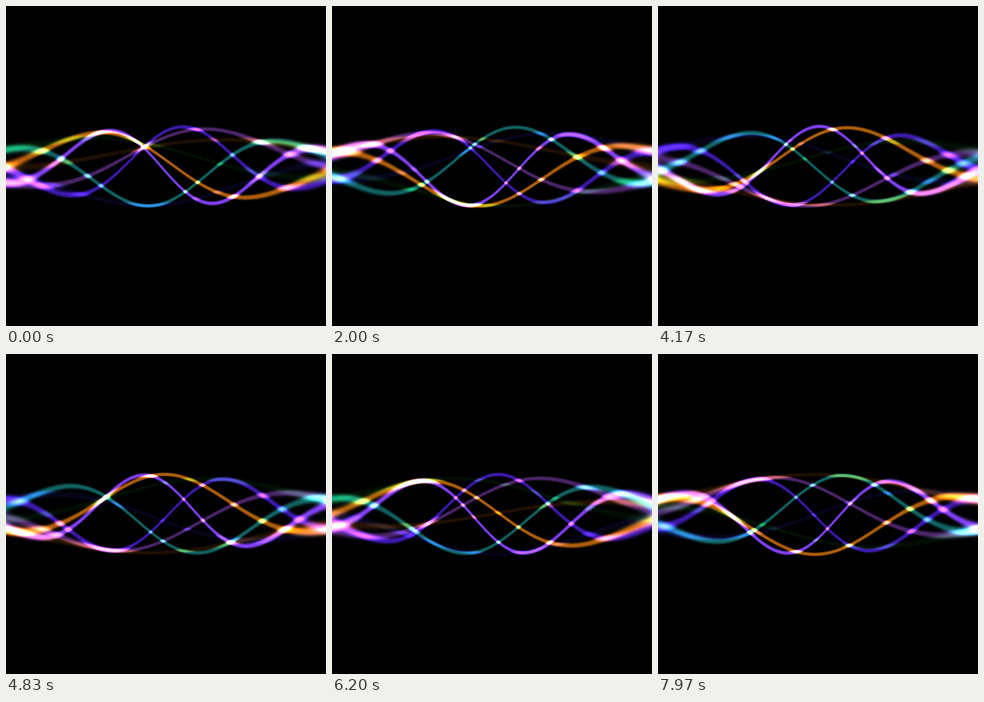
Write an HTML page with a canvas that moves like this. It is 400 px wide and 400 px high and loops after 8000 ms.

```html
<!DOCTYPE html>
<html lang="en">
<head>
<meta charset="utf-8">
<title>Light waves</title>
<style>
  html, body { margin: 0; width: 100%; height: 100%; overflow: hidden; background: #000; }
  canvas { display: block; width: 100%; height: 100%; }
</style>
</head>
<body>
<canvas id="stage" width="400" height="400"></canvas>
<script>
const SIZE = 400, MID = 200, TOP = 130, BAND = 140;
const LOOP = 8000, FRAME = 100 / 3;

// k: radians per pixel, w: radians per second, p: phase at the left edge.
// Light is added up first and squared afterwards, so crossings flare.
const waves = [
  { k: .02285, w: 1.085, p: -1.275, rgb: [.71, .5, .98] },
  { k: .0207,  w: 1.062, p: -3.045, rgb: [.49, .31, .82] },
  { k: .0176,  w: 1.047, p: 1.65,   rgb: [.26, .62, .62] },
  { k: .0147,  w: 1.014, p: .052,   rgb: [.83, .61, .22] },
  { k: .01153, w: .986,  p: -1.473, rgb: [.54, .38, .64] },
  { k: .0075,  w: .95,   p: -2.76,  rgb: [.16, .14, .33] },
  { k: .006,   w: .9375, p: 1.468,  rgb: [.08, .24, .1] },
  { k: .0035,  w: .92,   p: -.11,   rgb: [.35, .25, .05] }
];

// Towards the sides the lines swing less, widen and soften.
const columns = Array.from({ length: SIZE }, (_, x) => {
  const d = x + .5 - MID, u = Math.abs(d) / MID;
  return {
    swing: 50 * Math.exp(-d * d / 46000),
    width: 2.6 + 4 * u * u,
    power: 4 - 1.7 * u
  };
});

const ctx = document.getElementById("stage").getContext("2d");
const image = ctx.createImageData(SIZE, BAND);
const light = new Float32Array(SIZE * BAND * 3);

function addWave({ k, w, p, rgb: [r, g, b] }, seconds) {
  columns.forEach(({ swing, width, power }, x) => {
    const y = MID - TOP - swing * Math.sin(k * x + w * seconds + p);
    const reach = width * 2.2;
    const last = Math.min(BAND - 1, Math.floor(y + reach));
    for (let row = Math.max(0, Math.ceil(y - reach)); row <= last; row++) {
      const glow = Math.exp(-Math.pow(Math.abs(row - y) / width, power));
      const i = (row * SIZE + x) * 3;
      light[i] += r * glow;
      light[i + 1] += g * glow;
      light[i + 2] += b * glow;
    }
  });
}

function draw(ms) {
  light.fill(0);
  waves.forEach(wave => addWave(wave, ms / 1000));
  for (let i = 0, o = 0; i < light.length; i += 3, o += 4) {
    for (let c = 0; c < 3; c++) image.data[o + c] = 255 * light[i + c] ** 2;
    image.data[o + 3] = 255;
  }
  ctx.putImageData(image, 0, TOP);
}

let start, shown = -1;
function tick(now) {
  start ??= now;
  const step = Math.floor(((now - start) % LOOP + 5) / FRAME) % 240;
  if (step !== shown) draw((shown = step) * FRAME);
  requestAnimationFrame(tick);
}
ctx.fillRect(0, 0, SIZE, SIZE);
draw(0);
requestAnimationFrame(tick);
</script>
</body>
</html>
```
